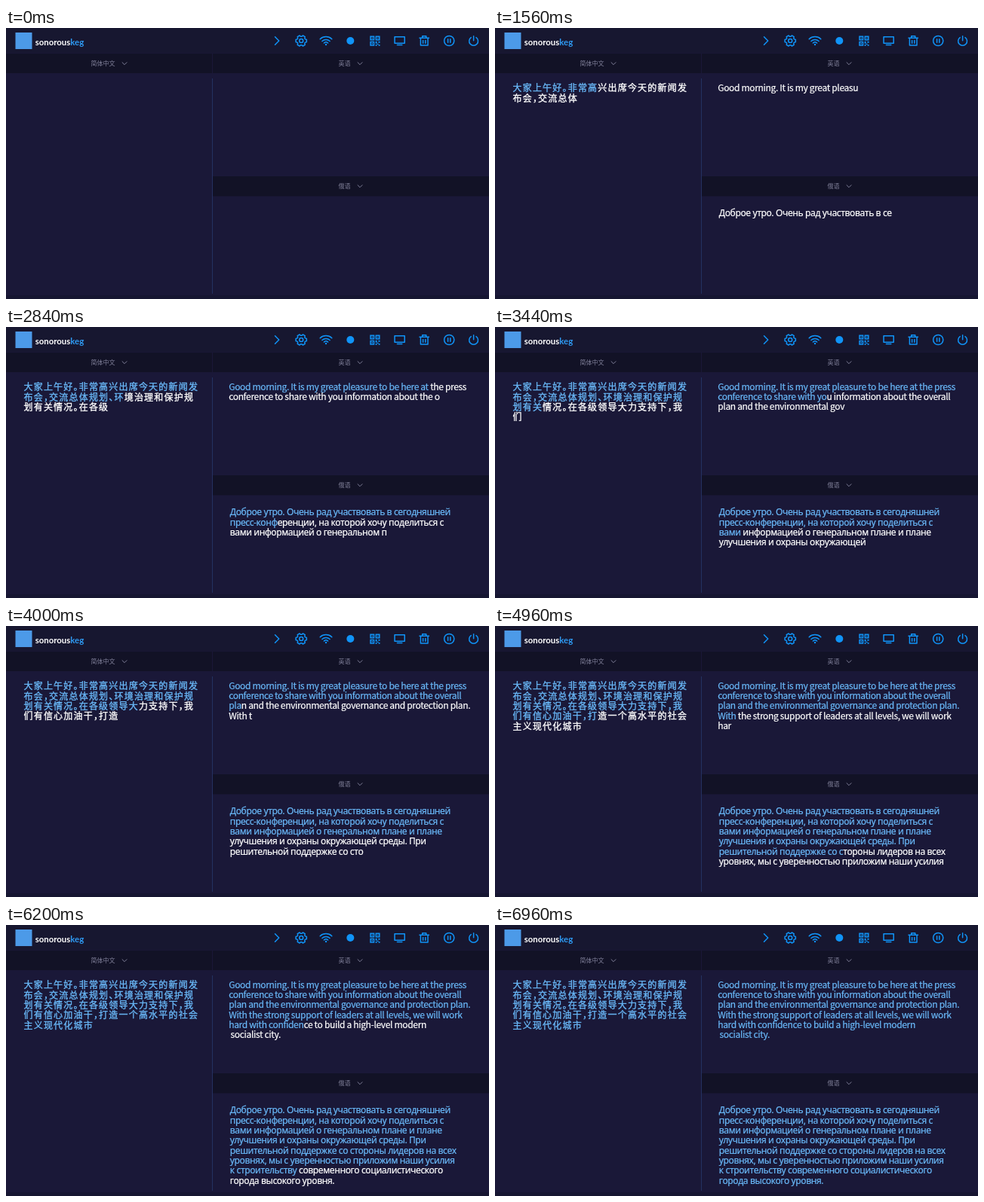
An HTML page that plays this animation: 640 px wide and 360 px high, repeating every 7040 ms.

```html
<!DOCTYPE html>
<html lang="zh-CN">
<head>
<meta charset="utf-8">
<title>Live translation</title>
<style>
  html, body { margin: 0; width: 100%; height: 100%; overflow: hidden; background: #1a1838; }
  svg { display: block; width: 100vw; height: 100vh; }
  text { white-space: pre; font: 400 12px "Noto Sans CJK SC", "Noto Sans CJK", "Noto Sans", sans-serif; }
  .label { font-size: 8px; fill: #80809a; }
  .chevron { fill: none; stroke: #80809a; stroke-width: 1; stroke-linecap: round; stroke-linejoin: round; }
  .icons { fill: none; stroke: #1094f8; stroke-width: 1.5; stroke-linecap: round; stroke-linejoin: round; }
  .solid { fill: #1094f8; stroke: none; }
  .brand { font: 700 11.4px Lato, sans-serif; fill: #fff; }
  .brand tspan { fill: #2f9cf5; }
  .typed { fill: #fff; stroke: #fff; stroke-width: .22px; }
  .typed .read { fill: #69b8f8; stroke: #69b8f8; }
  .zh { stroke-width: .35px; }
  .en { letter-spacing: -.33px; }
  .ru { letter-spacing: -.38px; font-family: "Noto Sans", sans-serif; }
</style>
</head>
<body>
<svg id="stage" viewBox="0 0 640 360">
  <rect width="640" height="360" fill="#1a1838"/>
  <rect width="640" height="33.5" fill="#171730"/>
  <rect y="355" width="640" height="5" fill="#161631"/>
  <g fill="#121226">
    <rect y="34" width="273" height="26"/>
    <rect x="274" y="34" width="366" height="26"/>
    <rect x="274" y="197" width="366" height="26.5"/>
  </g>
  <path d="M273.5 67V353" stroke="#243160"/>

  <rect x="12.5" y="6" width="22" height="22" fill="#4c9ae8"/>
  <text class="brand" x="38.7" y="22.6">sonorous<tspan>keg</tspan></text>

  <text class="label" x="112.5" y="50">简体中文</text>
  <text class="label" x="440.5" y="50">英语</text>
  <text class="label" x="440.5" y="213">俄语</text>
  <path class="chevron" d="M154 45.7l3 3l3-3M466 45.7l3 3l3-3M466 208.7l3 3l3-3"/>

  <g class="icons">
    <path d="M356.5 11.8l5.2 5.2l-5.2 5.2"/>
    <path id="gear"/>
    <circle cx="391.2" cy="17" r="2.5"/>
    <path d="M416.2 14.7a11.3 11.3 0 0 1 15.6 0M418.9 17.5a7.3 7.3 0 0 1 10.2 0M421.4 20a3.8 3.8 0 0 1 5.2 0"/>
    <circle class="solid" cx="424" cy="22" r="1.2"/>
    <circle class="solid" cx="456.3" cy="17" r="5"/>
    <g stroke-linejoin="miter">
      <path d="M483 11.2h4.5v4.5h-4.5zM490.3 11.2h4.5v4.5h-4.5zM483 18.5h4.5v4.5h-4.5z"/>
      <path class="solid" d="M484.5 12.7h1.6v1.6h-1.6zM491.8 12.7h1.6v1.6h-1.6zM484.5 20h1.6v1.6h-1.6zM489.6 17.8h2v3h-2zM493.4 17.8h2.1v2h-2.1zM491.6 20.8h2v1.2h-2zM489.6 22h2v1.7h-2zM493.6 22h1.9v1.7h-1.9z"/>
    </g>
    <path d="M515 11.8h13.2v8.4h-13.2zM518.4 22.6h6.4"/>
    <path d="M548 13.2h12.4M551.7 13v-2.2h5v2.2M549.4 13.4v9.6h9.6v-9.6M552.6 16.4v3.8M555.8 16.4v3.8"/>
    <circle cx="587.2" cy="17" r="6.6"/>
    <path d="M585.6 14.8v4.4M588.8 14.8v4.4"/>
    <path d="M619.6 10.8v6M616.2 12.6a5.9 5.9 0 1 0 6.8 0"/>
  </g>
</svg>
<script>
const LOOP = 7040, STEP = 40, READ_DELAY = 1000, LEADING = 40 / 3;
const stage = document.getElementById("stage");

// A line's trailing space counts as one typed character.
const columns = [
  { name: "zh", x: 23.5, y: 84.2, start: -31, rate: .016, lines: [
    "大家上午好。非常高兴出席今天的新闻发",
    "布会，交流总体规划、环境治理和保护规",
    "划有关情况。在各级领导大力支持下，我",
    "们有信心加油干，打造一个高水平的社会",
    "主义现代化城市"] },
  { name: "en", x: 295.2, y: 83.5, start: 990, rate: .062, lines: [
    "Good morning. It is my great pleasure to be here at the press ",
    "conference to share with you information about the overall ",
    "plan and the environmental governance and protection plan. ",
    "With the strong support of leaders at all levels, we will work ",
    "hard with confidence to build a high-level modern",
    " socialist city."] },
  { name: "ru", x: 296.8, y: 250.4, start: 1000, rate: .07062, lines: [
    "Доброе утро. Очень рад участвовать в сегодняшней ",
    "пресс-конференции, на которой хочу поделиться с ",
    "вами информацией о генеральном плане и плане ",
    "улучшения и охраны окружающей среды. При ",
    "решительной поддержке со стороны лидеров на всех ",
    "уровнях, мы с уверенностью приложим наши усилия ",
    "к строительству современного социалистического ",
    "города высокого уровня."] }
];

function add(parent, tag, attrs) {
  const el = document.createElementNS("http://www.w3.org/2000/svg", tag);
  for (const key in attrs) el.setAttribute(key, attrs[key]);
  return parent.appendChild(el);
}

// Chinese is tracked by a tenth of an em, with half-width punctuation.
function hanziX(line, x) {
  return [...line].map(c => {
    const left = x;
    x += "，。、".includes(c) ? 7.2 : 13.2;
    return left;
  }).join(" ");
}

for (const col of columns) {
  let offset = 0;
  col.rows = col.lines.map((line, i) => {
    const x = col.name === "zh" ? hanziX(line, col.x) : col.x;
    const text = add(stage, "text", { class: "typed " + col.name, x, y: col.y + i * LEADING });
    const row = { line, offset, read: add(text, "tspan", { class: "read" }), fresh: add(text, "tspan", {}) };
    offset += line.length;
    return row;
  });
}

const teeth = [];
for (let k = 0; k < 6; k++)
  for (const [turn, r] of [[-23, 5.7], [-13, 7.3], [13, 7.3], [23, 5.7]]) {
    const a = (k * 60 + turn) * Math.PI / 180;
    teeth.push((391.2 + r * Math.cos(a)).toFixed(2) + " " + (17 + r * Math.sin(a)).toFixed(2));
  }
document.getElementById("gear").setAttribute("d", "M" + teeth.join("L") + "Z");

function draw(now) {
  const t = Math.floor(now % LOOP / STEP) * STEP;
  for (const col of columns) {
    const count = time => Math.max(0, Math.floor(col.rate * (time - col.start)));
    const typed = count(t), read = t < READ_DELAY ? 0 : count(t - READ_DELAY);
    for (const row of col.rows) {
      const from = Math.max(0, read - row.offset), to = Math.max(0, typed - row.offset);
      row.read.textContent = row.line.slice(0, from);
      row.fresh.textContent = row.line.slice(from, to);
    }
  }
}

const begin = performance.now();
function tick() {
  draw(performance.now() - begin);
  requestAnimationFrame(tick);
}
tick();
</script>
</body>
</html>
```
